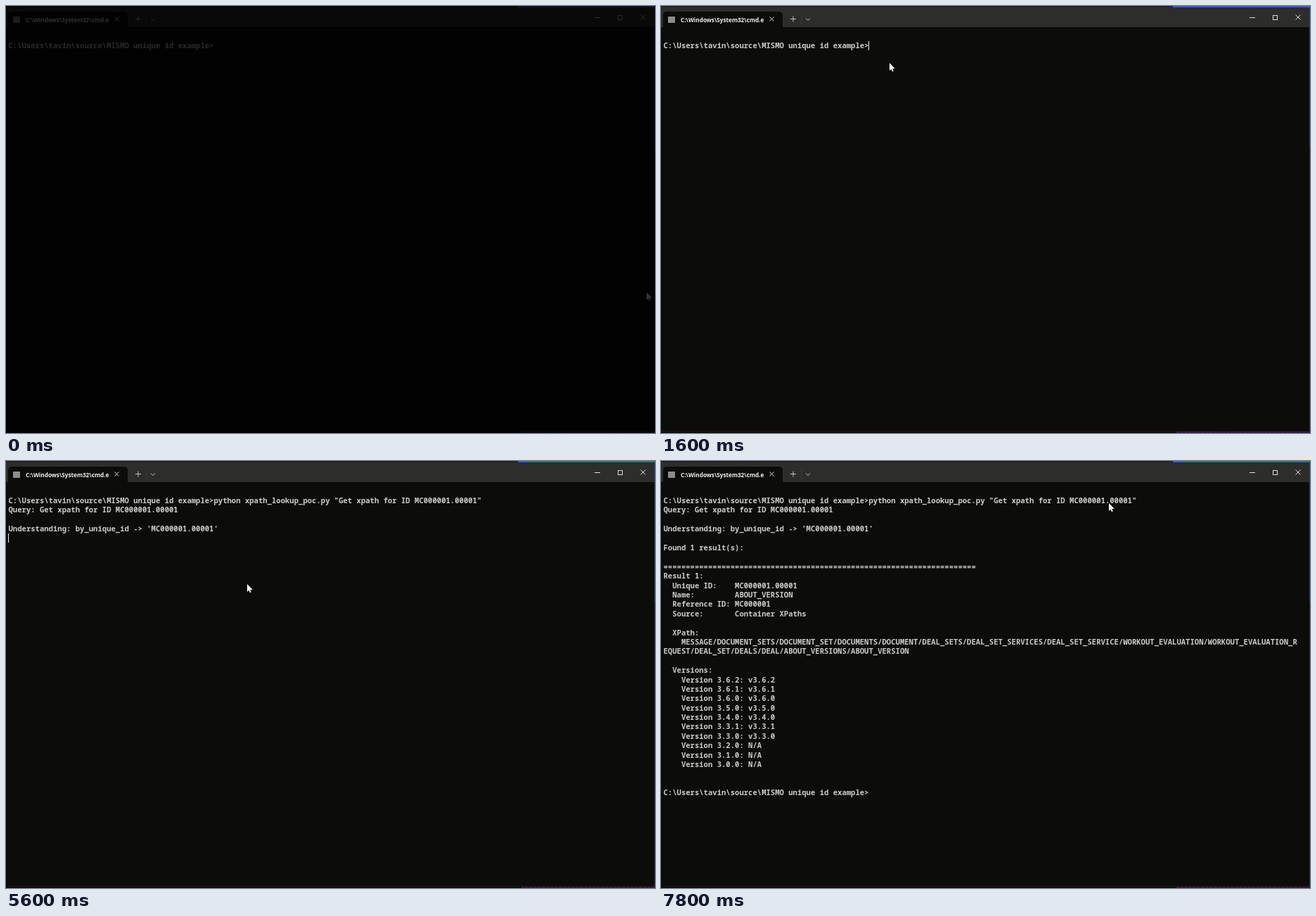
Write an HTML page with a canvas that moves like this. It is 923x607 px and loops after 8000 ms.

```html
<!DOCTYPE html>
<html lang="en">
<head>
<meta charset="utf-8">
<title>Terminal</title>
<style>
  html, body { margin: 0; width: 100%; height: 100%; overflow: hidden; background: #000; }
  canvas { display: block; }
</style>
</head>
<body>
<canvas id="stage" width="923" height="607"></canvas>
<script>
const W = 923, H = 607, LOOP = 8000, STEP = 200, BLINK = 500;
const ctx = document.getElementById('stage').getContext('2d');

const BG = '#0c0c0a', BAR = '#2d2d2c', TEXT = '#cccccc', WHITE = '#f2f2f2', ICON = '#dddddd';
const CELL = 6.354, ROW = 13.39, LEFT = 3.5, TOP = 49.8;

const ID = 'MC000001.00001';
const QUERY = `Get xpath for ID ${ID}`;
const PROMPT = 'C:\\Users\\tavin\\source\\MISMO unique id example>';
const VERSIONS = '3.6.2 3.6.1 3.6.0 3.5.0 3.4.0 3.3.1 3.3.0 3.2.0 3.1.0 3.0.0'.split(' ');
const RESULT = `
Found 1 result(s):

${'='.repeat(70)}
Result 1:
  Unique ID:    ${ID}
  Name:         ABOUT_VERSION
  Reference ID: MC000001
  Source:       Container XPaths

  XPath:
    MESSAGE/DOCUMENT_SETS/DOCUMENT_SET/DOCUMENTS/DOCUMENT/DEAL_SETS/DEAL_SET_SERVICES/DEAL_SET_SERVICE/WORKOUT_EVALUATION/WORKOUT_EVALUATION_R
EQUEST/DEAL_SET/DEALS/DEAL/ABOUT_VERSIONS/ABOUT_VERSION

  Versions:
${VERSIONS.map(v => `    Version ${v}: ${v < '3.3' ? 'N/A' : 'v' + v}`).join('\n')}

`;

// Each step appends text; the caret sits at the end and restarts its blink
const SESSION = [
  { at: 0, text: PROMPT, caret: false },
  { at: 1400, text: '', caret: true },
  { at: 2600, text: `python xpath_lookup_poc.py "${QUERY}"`, caret: true },
  { at: 2800, text: '', caret: false },
  { at: 3200, text: '\n', caret: true },
  { at: 3800, text: `Query: ${QUERY}\n\n`, caret: true },
  { at: 5600, text: `Understanding: by_unique_id -> '${ID}'\n`, caret: true },
  { at: 6000, text: RESULT, caret: true },
  { at: 6200, text: '\n' + PROMPT, caret: true },
];

const HOME = { x: 911, y: 407 };
const MOVES = [
  { at: 800, span: 800, x: 325, y: 81 },
  { at: 3200, span: 600, x: 343, y: 175 },
  { at: 6200, span: 1200, x: 637, y: 60 },
];

const clamp = u => Math.max(0, Math.min(1, u));
const smooth = u => u * u * (3 - 2 * u);

function pointerAt(t) {
  let { x, y } = HOME;
  for (const m of MOVES) {
    const u = smooth(clamp((t - m.at) / m.span));
    x += (m.x - x) * u;
    y += (m.y - y) * u;
  }
  return [x, y];
}

function rect(x, y, w, h, color) {
  ctx.fillStyle = color;
  ctx.fillRect(x, y, w, h);
}

function line(color, x, y, ...rest) {
  ctx.strokeStyle = color;
  ctx.lineWidth = 1;
  ctx.beginPath();
  ctx.moveTo(x, y);
  for (let i = 0; i < rest.length; i += 2) ctx.lineTo(rest[i], rest[i + 1]);
  ctx.stroke();
}

function cross(x, y, r) {
  line(ICON, x - r, y - r, x + r, y + r);
  line(ICON, x - r, y + r, x + r, y - r);
}

function drawDesktop() {
  rect(0, 0, W, H, BG);
  rect(0, 0, W, 2, '#232426');
  rect(728, 0, W - 728, 2, '#3c62b0');
  rect(922, 2, 1, 198, '#2b3b66');
  rect(922, 200, 1, 404, '#25232e');
  rect(0, 604, W, 1, '#281318');
  rect(733, 605, W - 733, 2, '#2a1438');
  for (let x = 733; x < W; x += 6) rect(x, 605, 3, 2, '#3a1d48');
}

function drawTitleBar() {
  rect(0, 2, 922, 28, BAR);
  ctx.fillStyle = BG;
  ctx.beginPath();
  ctx.roundRect(3, 8, 170, 22, [5, 5, 0, 0]);
  ctx.fill();

  rect(10, 15, 10, 9, '#8c8c8c');
  ctx.font = '700 8.2px "Open Sans", "Noto Sans", sans-serif';
  ctx.fillStyle = WHITE;
  ctx.fillText('C:\\Windows\\System32\\cmd.e', 28, 22.6);

  cross(157.5, 18.5, 3);
  line('#c4c4c4', 184, 18.5, 192, 18.5);
  line('#c4c4c4', 188, 14.5, 188, 22.5);
  line('#3b3b3a', 199.5, 12, 199.5, 26);
  line('#c4c4c4', 206, 17.5, 209, 20.5, 212, 17.5);
  line(ICON, 837, 16.5, 845, 16.5);
  ctx.strokeRect(870.5, 13.5, 6, 6);
  cross(906, 16, 3.5);
}

function drawConsole(t) {
  const done = SESSION.filter(s => s.at <= t);
  const lines = done.map(s => s.text).join('').split('\n');
  ctx.font = `600 ${CELL / 0.6}px "Noto Sans Mono", "DejaVu Sans Mono", monospace`;
  ctx.fillStyle = TEXT;
  lines.forEach((s, i) => ctx.fillText(s, LEFT, TOP + i * ROW + 10.3));

  const last = done[done.length - 1];
  if (last.caret && Math.floor((t - last.at) / BLINK) % 2 === 0) {
    const row = lines.length - 1;
    rect(Math.floor(LEFT + lines[row].length * CELL), Math.round(TOP + row * ROW), 1, 13, WHITE);
  }
}

function drawPointer(x, y) {
  ctx.save();
  ctx.translate(x, y);
  ctx.fillStyle = '#ffffff';
  ctx.fill(new Path2D('M0 0V11L2.5 8.8L4 12.3L5.7 11.6L4.2 8.2L7.6 7.8Z'));
  ctx.restore();
}

function frame(now) {
  const t = Math.floor((now % LOOP) / STEP) * STEP;
  drawDesktop();
  drawTitleBar();
  drawConsole(t);
  drawPointer(...pointerAt(t));
  const light = clamp(0.2 + t / 1000);
  rect(0, 0, W, H, `rgba(0, 0, 0, ${1 - light})`);
  requestAnimationFrame(frame);
}

requestAnimationFrame(frame);
</script>
</body>
</html>
```
